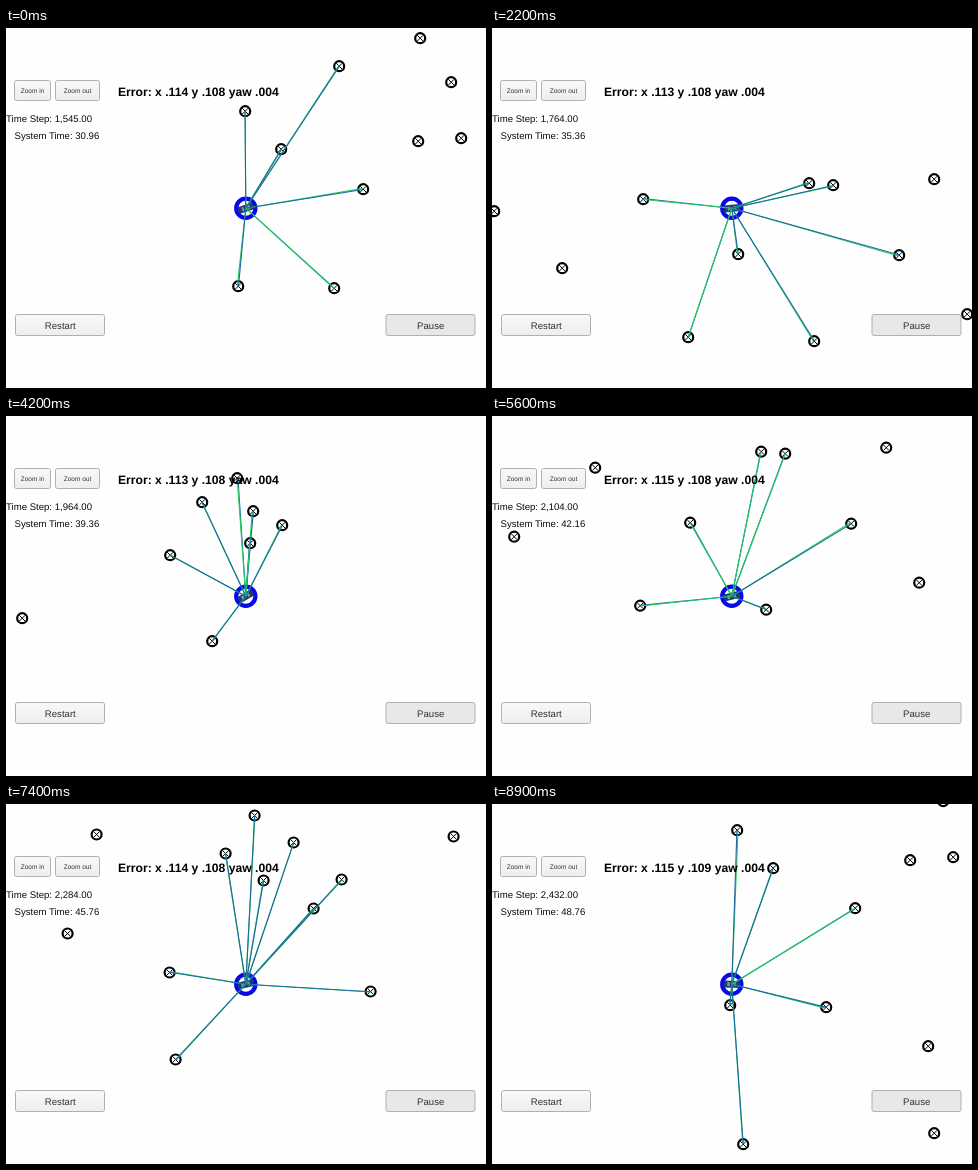
These frames come from a looping animation (480x360 px, 9000 ms). An HTML page with a canvas:

```html
<!DOCTYPE html>
<html lang="en">
<head>
<meta charset="utf-8">
<title>Localization simulator</title>
<style>
  html, body { margin: 0; width: 100%; height: 100%; overflow: hidden; background: #fefefe; }
  canvas, svg { position: absolute; left: 0; top: 0; width: 480px; height: 360px; }
  text {
    font-family: "Liberation Sans", Arial, sans-serif; font-size: 9.6px; fill: #0c0c0c;
    text-rendering: geometricPrecision;
  }
  .error { font-size: 12.15px; font-weight: bold; fill: #000; }
  .button text { fill: #323232; text-anchor: middle; }
  .button .small { font-size: 6.5px; }
  .button rect { fill: url(#face); stroke: #b0b0b0; }
  .button .pressed { fill: #e8e8e8; }
</style>
</head>
<body>
<canvas id="scene" width="480" height="360"></canvas>
<svg viewBox="0 0 480 360">
  <defs>
    <linearGradient id="face" x1="0" y1="0" x2="0" y2="1">
      <stop offset="0" stop-color="#f8f8f8"/>
      <stop offset="1" stop-color="#eeeeee"/>
    </linearGradient>
  </defs>
  <g class="button">
    <rect x="8.5" y="52.5" width="36" height="20" rx="2"/>
    <text class="small" x="26.5" y="65.3">Zoom in</text>
    <rect x="49.5" y="52.5" width="44" height="20" rx="2"/>
    <text class="small" x="71.5" y="65.3">Zoom out</text>
    <rect x="9.5" y="286.5" width="89" height="21" rx="2"/>
    <text x="54.3" y="300.5">Restart</text>
    <rect class="pressed" x="380" y="286.5" width="89" height="21" rx="2"/>
    <text x="424.7" y="300.5">Pause</text>
  </g>
  <text class="error" id="error" x="112" y="68"></text>
  <text id="step" x="0" y="93.5"></text>
  <text id="clock" x="8.5" y="111"></text>
</svg>
<script>
const FRAME_MS = 100, FRAMES = 90, RANGE = 178;
const CAR = { x: 239.8, y: 180.2 };

// Surveyed map, in screen pixels around the first pose
const landmarks = [
  [414, 10], [445, 54], [333, 38], [239, 83], [275, 121], [412, 113], [455, 110],
  [357, 161], [232, 258], [328, 260], [245, 397], [430, 299], [436, 386], [513, -15],
  [682, -38], [609, 31], [750, 19], [515, 142], [554, 169], [714, 163], [486, 180],
  [524, 207], [602, 206], [574, 235], [631, 318], [831, -50], [997, -66], [1021, -64],
  [1122, -70], [926, 5], [1087, 6], [876, 88], [1002, 92], [1155, 65], [1370, -75],
  [1335, -51], [1386, -42], [1415, -28], [1303, 2], [1383, -10], [1345, 88]
];

// Key poses of the drive: frame, x, y
const route = [
  [0, 240, 180], [10, 515, 83], [13, 587, -13], [22, 920, -41],
  [30, 1189, -71], [38, 1455, -5], [42, 1379, 43], [46, 1270, 104],
  [56, 968, 78.5], [74, 506.6, 310.7], [80, 409, 243], [89, 234, 237]
];

const ctx = document.getElementById("scene").getContext("2d");
const label = id => document.getElementById(id);
const errorText = label("error"), stepText = label("step"), clockText = label("clock");

function slope(i, axis) {
  const a = route[Math.max(i - 1, 0)], b = route[Math.min(i + 1, route.length - 1)];
  return (b[axis] - a[axis]) / (b[0] - a[0]);
}

// Cubic Hermite spline through the key poses
function place(frame, axis) {
  let i = 0;
  while (i < route.length - 2 && frame >= route[i + 1][0]) i++;
  const a = route[i], b = route[i + 1], span = b[0] - a[0];
  const u = (frame - a[0]) / span, v = 1 - u;
  return v * v * (1 + 2 * u) * a[axis] + u * u * (3 - 2 * u) * b[axis]
    + span * u * v * (v * slope(i, axis) - u * slope(i + 1, axis));
}

function noise(frame, i, k) {
  const n = Math.sin(frame * 12.9898 + i * 78.233 + k * 37.719) * 43758.5453;
  return n - Math.floor(n);
}

function line(x1, y1, x2, y2) {
  ctx.beginPath();
  ctx.moveTo(x1, y1);
  ctx.lineTo(x2, y2);
  ctx.stroke();
}

function ring(x, y, r, width, color) {
  ctx.beginPath();
  ctx.arc(x, y, r, 0, 2 * Math.PI);
  ctx.lineWidth = width;
  ctx.strokeStyle = color;
  ctx.stroke();
}

function drawLandmark(x, y) {
  ring(x, y, 5, 2.2, "#000");
  ctx.lineWidth = 1;
  line(x - 3, y - 3, x + 3, y + 3);
  line(x - 3, y + 3, x + 3, y - 3);
}

function drawCar(angle) {
  ring(CAR.x, CAR.y, 9.6, 4.2, "#0808ea");
  ctx.save();
  ctx.translate(CAR.x, CAR.y);
  ctx.rotate(angle);
  ctx.fillStyle = "#1d3a78";
  ctx.fillRect(-8, -3.5, 16, 7);
  ctx.fillStyle = "#8795a8";
  ctx.fillRect(-4, -2, 2, 4);
  ctx.fillRect(2, -2, 2.5, 4);
  ctx.restore();
}

// Two sensor beams, true and estimated, almost on top of each other
function drawBeams(frame, i, x, y) {
  const green = "#20cc5c", blue = "#1c68a2";
  const colors = noise(frame, i, 0) < 0.72 ? [green, blue] : [blue, green];
  ctx.lineWidth = 1.1;
  colors.forEach((color, k) => {
    const spread = k ? 0.6 : 2;
    ctx.strokeStyle = color;
    line(CAR.x, CAR.y,
      x + (noise(frame, i, k + 1) - 0.5) * spread,
      y + (noise(frame, i, k + 3) - 0.5) * spread);
  });
}

function drawScene(frame) {
  const x = place(frame, 1), y = place(frame, 2);
  const before = Math.max(frame - 0.5, 0), after = Math.min(frame + 0.5, FRAMES - 1);
  const angle = Math.atan2(place(after, 2) - place(before, 2), place(after, 1) - place(before, 1));
  const seen = landmarks.map(([lx, ly]) => [lx - x + 240.2, ly - y + 180.2]);

  ctx.clearRect(0, 0, 480, 360);
  seen.forEach(p => drawLandmark(...p));
  drawCar(angle);
  seen.forEach((p, i) => {
    if (Math.hypot(p[0] - CAR.x, p[1] - CAR.y) < RANGE) drawBeams(frame, i, ...p);
  });
}

function drawReadout(frame) {
  const time = 30.96 + frame * 0.2;
  const lag = frame < 5 ? 3 : frame < 82 ? 4 : 6;
  const step = Math.round(time * 50) - lag;
  const ex = frame < 8 ? 114 : frame < 49 ? 113 : frame < 66 ? 115 : frame < 82 ? 114 : 115;
  const ey = frame < 82 ? 108 : 109;
  errorText.textContent = `Error: x .${ex} y .${ey} yaw .004`;
  stepText.textContent = `Time Step: ${step.toLocaleString("en-US")}.00`;
  clockText.textContent = `System Time: ${time.toFixed(2)}`;
}

const start = performance.now();
let shown = -1;

function tick() {
  const frame = Math.floor((performance.now() - start) / FRAME_MS) % FRAMES;
  if (frame !== shown) {
    shown = frame;
    drawScene(frame);
    drawReadout(frame);
  }
  requestAnimationFrame(tick);
}
tick();
</script>
</body>
</html>
```
